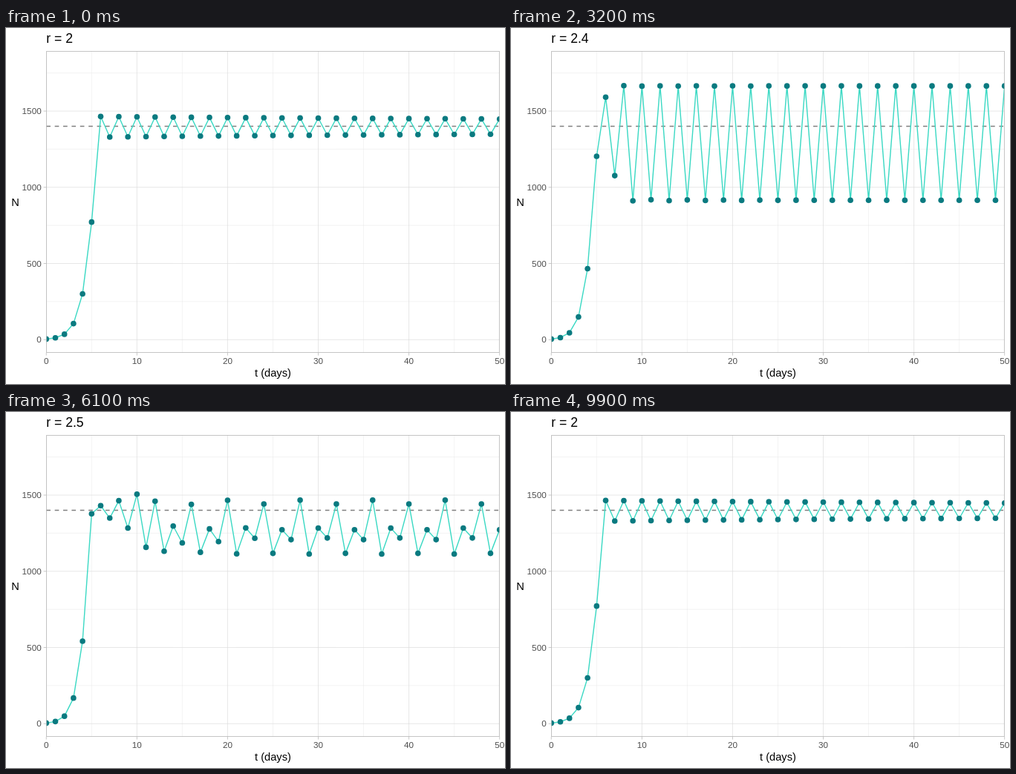
An HTML page with a canvas that plays this animation: 672x480 px, repeating every 10 s.

```html
<!DOCTYPE html>
<html lang="en">
<head>
<meta charset="utf-8">
<title>Discrete logistic growth</title>
<style>
  html, body { margin: 0; width: 100%; height: 100%; overflow: hidden; background: #fff; }
  canvas { display: block; }
</style>
</head>
<body>
<canvas id="stage" width="672" height="480"></canvas>
<script>
const ctx = document.getElementById('stage').getContext('2d');

const CAPACITY = 1400, START = 4, DAYS = 50;
const FRAME_MS = 100, FRAMES = 100, TWEEN_FRAMES = 8;
const rates = [2, 2.2, 2.4, 2.5, 2.55, 2.8];
const tweenStarts = [8, 25, 42, 58, 75, 91];   // last resting frame of each state

const left = 54.27, right = 664.67, top_ = 31, bottom = 437.9;
const yMin = -86, yMax = 1894.4;
const px = day => left + day / DAYS * (right - left);
const py = n => bottom - (n - yMin) / (yMax - yMin) * (bottom - top_);

function grow(rate) {
  const series = [START];
  for (let day = 0; day < DAYS; day++) {
    const n = series[day];
    series.push(n + rate * n * (1 - n / CAPACITY));
  }
  return series;
}
const populations = rates.map(grow);

function stroke(points, color, width, dash = []) {
  ctx.beginPath();
  points.forEach(([x, y]) => ctx.lineTo(x, y));
  ctx.strokeStyle = color;
  ctx.lineWidth = width;
  ctx.setLineDash(dash);
  ctx.stroke();
  ctx.setLineDash([]);
}
const vertical = (day, width) => stroke([[px(day), top_], [px(day), bottom]], '#dedede', width);
const horizontal = (n, width) => stroke([[left, py(n)], [right, py(n)]], '#dedede', width);

function text(str, x, y, size, color, align) {
  ctx.font = `${size}px "Liberation Sans", Arial, sans-serif`;
  ctx.fillStyle = color;
  ctx.textAlign = align;
  ctx.fillText(str, x, y);
}

function drawGrid() {
  for (let day = 5; day < DAYS; day += 10) vertical(day, 0.36);
  for (let n = 250; n < yMax; n += 500) horizontal(n, 0.36);
  for (let day = 0; day <= DAYS; day += 10) vertical(day, 0.71);
  for (let n = 0; n <= 1500; n += 500) horizontal(n, 0.71);
}

function drawAxes() {
  for (let day = 0; day <= DAYS; day += 10) {
    stroke([[px(day), bottom], [px(day), bottom + 3.67]], '#b3b3b3', 0.71);
    text(day, px(day), 452.9, 11.73, '#4d4d4d', 'center');
  }
  for (let n = 0; n <= 1500; n += 500) {
    stroke([[left - 3.67, py(n)], [left, py(n)]], '#b3b3b3', 0.71);
    text(n, 47.67, py(n) + 4.2, 11.73, '#4d4d4d', 'right');
  }
  text('t (days)', (left + right) / 2, 469.6, 14.67, '#000', 'center');
  text('N', 7.33, 239.7, 14.67, '#000', 'left');
}

function drawSeries(series) {
  const points = series.map((n, day) => [px(day), py(n)]);
  stroke(points, '#3cd9c4', 1.42);
  ctx.fillStyle = '#0a7a80';
  for (const [x, y] of points) {
    ctx.beginPath();
    ctx.arc(x, y, 3.8, 0, 2 * Math.PI);
    ctx.fill();
  }
}

function stateAt(frame) {
  let from = 0;
  while (from < rates.length - 1 && frame >= tweenStarts[from + 1]) from++;
  const to = (from + 1) % rates.length;
  const p = Math.min(1, Math.max(0, (frame - tweenStarts[from]) / TWEEN_FRAMES));
  return {
    rate: rates[p > 0.5 ? to : from],
    series: populations[from].map((n, day) => n + (populations[to][day] - n) * p)
  };
}

function draw(frame) {
  const { rate, series } = stateAt(frame);
  ctx.fillStyle = '#fff';
  ctx.fillRect(0, 0, 672, 480);
  ctx.lineJoin = 'round';

  ctx.save();
  ctx.beginPath();
  ctx.rect(left, top_, right - left, bottom - top_);
  ctx.clip();
  drawGrid();
  stroke([[left, py(CAPACITY)], [right, py(CAPACITY)]], '#7f7f7f', 1.42, [5.69, 5.69]);
  drawSeries(series);
  ctx.strokeStyle = '#b3b3b3';
  ctx.lineWidth = 1.42;
  ctx.strokeRect(left, top_, right - left, bottom - top_);
  ctx.restore();

  drawAxes();
  text(`r = ${rate}`, left, 20, 17.6, '#000', 'left');
}

const began = performance.now();
function tick() {
  draw(Math.floor((performance.now() - began) / FRAME_MS) % FRAMES);
  requestAnimationFrame(tick);
}
tick();
</script>
</body>
</html>
```
